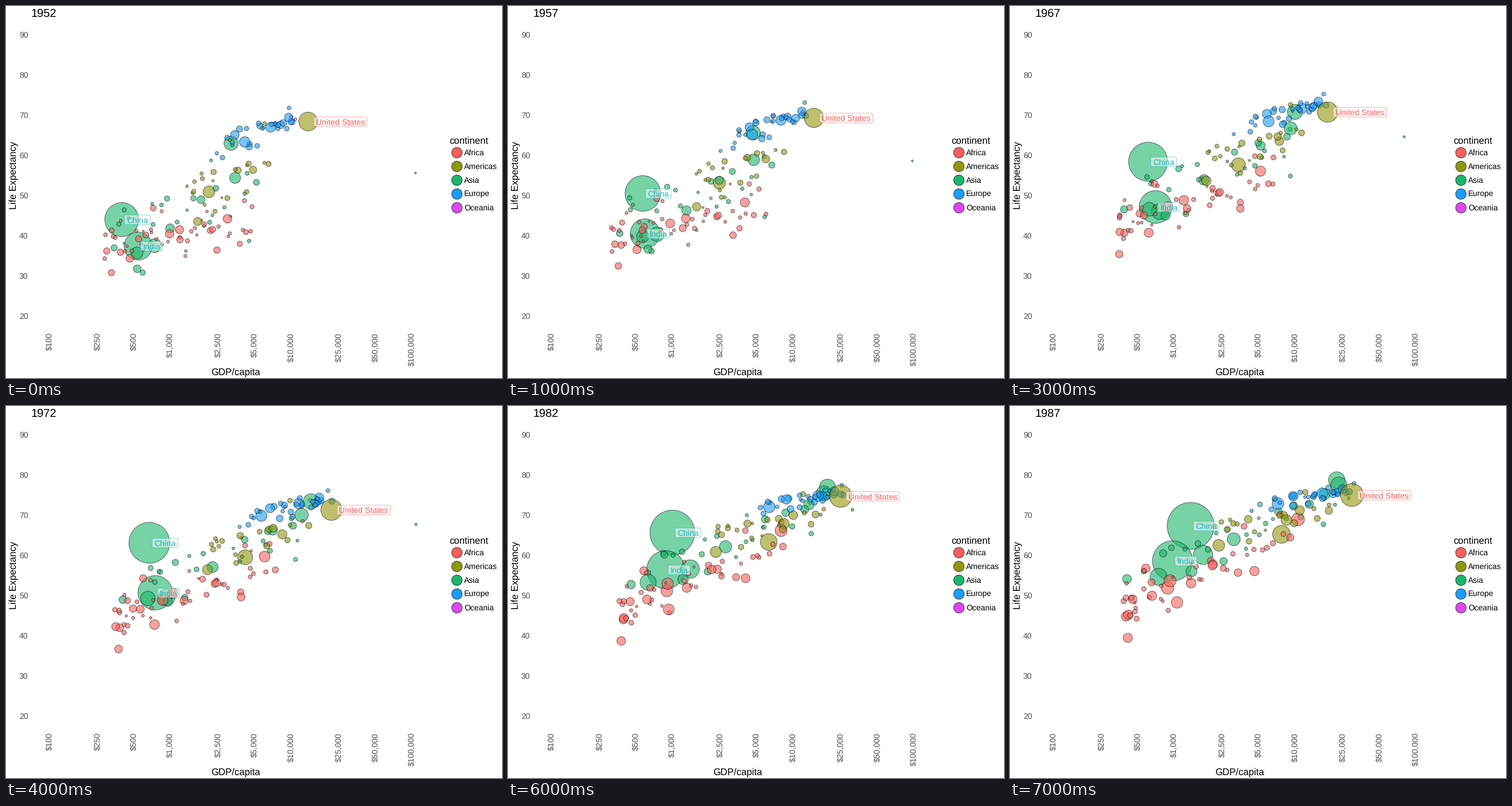
Write a matplotlib script that moves like this. It is 864 by 648 pixels and loops after 8000 ms.

```python
import numpy as np
import matplotlib.pyplot as plt
from matplotlib.animation import FuncAnimation
from matplotlib.colors import to_rgba
from matplotlib.patches import FancyBboxPatch

W, H, DPI = 864, 648, 72
STEPS = 8
FIRST_YEAR, YEAR_STEP = 1952, 5
TIME = np.linspace(0, 1, STEPS)
EASE = TIME * (3 - TIME) / 2

plt.rcParams["font.family"] = "Liberation Sans"
plt.rcParams["text.hinting"] = "no_hinting"

COLORS = {
    "Africa": "#f8605b",
    "Americas": "#92970a",
    "Asia": "#1cb56b",
    "Europe": "#199df8",
    "Oceania": "#dd46f0",
}
GREY, TEAL, RED = "#4d4d4d", "#1fb3bf", "#f8605b"

# Clouds of small countries, as (count, median population, population spread,
# population growth), then the shape at the start and at the end:
# (lowest log income, income span, skew, mid life, life per decade, life noise)
CLOUDS = {
    "Oceania": ((2, 5, 0.9, 1.8), (4.0, 0.03, 1, 69.2, 0, 0.2), (4.27, 0.07, 1, 75.3, 20, 0.3)),
    "Asia": ((28, 5, 1.1, 2.3), (2.5, 1.25, 1, 45, 11, 6), (2.6, 1.8, 0.85, 66, 12, 2.8)),
    "Africa": ((52, 2.8, 1.05, 2.45), (2.47, 1.25, 1.3, 39.5, 3, 4), (2.6, 1.45, 1.8, 52.5, 13, 4.2)),
    "Americas": ((23, 3, 1.05, 2.4), (3.13, 0.7, 1.2, 53.5, 20, 4.5), (3.33, 1.0, 1.2, 68.5, 9, 2.5)),
    "Europe": ((30, 8, 0.95, 1.25), (3.3, 0.72, 0.65, 66, 15, 1.6), (3.57, 0.9, 0.6, 74.8, 6, 0.9)),
}

# Single bubbles: continent, population range, key points (step, income, life)
TRACKS = {
    "China": ("Asia", (556, 1084), [
        (0, 400, 44), (1, 576, 50.5), (2, 488, 44.5), (3, 613, 58.4),
        (4, 677, 63.1), (5, 741, 64), (7, 1379, 67.3)]),
    "India": ("Asia", (372, 788), [
        (0, 547, 37.4), (2, 658, 43.6), (5, 813, 54.2), (7, 977, 58.6)]),
    "Japan": ("Asia", (86, 122), [(0, 3217, 63), (4, 14779, 73.4), (7, 22376, 78.7)]),
    "Indonesia": ("Asia", (82, 169), [(0, 750, 37.5), (3, 762, 46), (7, 1748, 60.1)]),
    "Kuwait": ("Asia", (0.16, 1.9), [
        (0, 108382, 55.6), (3, 80895, 64.6), (4, 109348, 67.7), (6, 31354, 71.3),
        (7, 28118, 74.2)]),
    "Brazil": ("Americas", (57, 143), [(0, 2109, 50.9), (3, 3430, 57.6), (7, 7807, 65.2)]),
    "United States": ("Americas", (158, 243), [
        (0, 13990, 68.4), (2, 16173, 70.2), (4, 21806, 71.3), (6, 25010, 74.7),
        (7, 29884, 75)]),
}


def x_pos(log_income):
    return 75 + 210.3 * (log_income - 2)


def y_pos(life):
    return 680 - 7 * life


def path(log_income, life, pop):
    radius = 1.1 + 1.21 * np.sqrt(pop)
    return np.column_stack([x_pos(log_income), y_pos(life), radius])


def track(name):
    _, pop, keys = TRACKS[name]
    step, income, life = np.array(keys).T
    now = np.arange(STEPS)
    return path(np.interp(now, step, np.log10(income)),
                np.interp(now, step, life), np.geomspace(*pop, STEPS))


def ranks(values):
    """Evenly spread numbers in 0..1 in the order of the values."""
    return (np.argsort(np.argsort(values)) + 0.5) / len(values)


def cloud(continent, rng):
    (n, median, spread, growth), first, last = CLOUDS[continent]
    low, span, skew, life, slope, noise = (
        a + (b - a) * EASE for a, b in zip(first, last))
    start = ranks(rng.random(n))
    end = ranks(start + 0.15 * rng.normal(size=n))
    luck = np.clip(rng.normal(size=n), -2, 2)
    size = np.clip(rng.normal(size=n), -2.2, 2.2)
    for k in range(n):
        q = start[k] + (end[k] - start[k]) * TIME
        income = low + span * q ** skew
        offset = income - low - span * 0.5 ** skew
        wobble = 0.02 * rng.normal(size=STEPS)
        pop = median * np.exp(spread * size[k]) * growth ** TIME
        yield path(income + wobble, life + slope * offset + noise * luck[k], pop)


def build():
    rng = np.random.default_rng(12)
    *others, front = TRACKS
    items = [(c, p) for c in ["Oceania"] for p in cloud(c, rng)]
    items += [(TRACKS[name][0], track(name)) for name in others]
    items += [(c, p) for c in CLOUDS if c != "Oceania" for p in cloud(c, rng)]
    items.append((TRACKS[front][0], track(front)))
    return [c for c, _ in items], np.array([p for _, p in items])


continents, paths = build()

fig = plt.figure(figsize=(W / DPI, H / DPI), dpi=DPI, facecolor="white")
ax = fig.add_axes([0, 0, 1, 1])
ax.set_xlim(0, W)
ax.set_ylim(H, 0)
ax.axis("off")


def write(x, y, text, size, **style):
    return ax.text(x, y, text, size=size, va="baseline",
                   rotation_mode="anchor", **style)


for v in range(20, 100, 10):
    write(38.5, y_pos(v) + 5, str(v), 14, color=GREY, ha="right")
for v in [m * 10 ** e for e in (2, 3, 4) for m in (1, 2.5, 5)] + [10 ** 5]:
    write(x_pos(np.log10(v)) + 5, 569, f"${v:,.0f}", 14, color=GREY,
          ha="right", rotation=90)
write(400, 642, "GDP/capita", 16.8, ha="center")
write(17, 295, "Life Expectancy", 16.8, ha="center", rotation=90)

write(772.5, 240, "continent", 16.8)
for k, (name, color) in enumerate(COLORS.items()):
    y = 254.5 + 24 * k
    ax.scatter([784.5], [y], s=18.4 ** 2, c=color, edgecolors="#333333", linewidths=0.9)
    write(798, y + 5, name, 13.9)

title = write(43, 20, "", 20)
dots = ax.scatter(paths[:, 0, 0], paths[:, 0, 1],
                  facecolors=[to_rgba(COLORS[c], 0.6) for c in continents],
                  edgecolors=[(0, 0, 0, 0.6)], linewidths=0.9, zorder=2)


class Label:
    """Country tag that follows its bubble."""

    def __init__(self, name, color, z):
        self.path = track(name)
        self.text = write(0, 0, name, 14.3, color=color, zorder=z + 0.1)
        width = self.text.get_window_extent(fig.canvas.get_renderer()).width
        self.shift = 5 + 0.1 * width
        self.box = FancyBboxPatch((0, 0), width + 7.5, 16.5, zorder=z,
                                  boxstyle="round,pad=0,rounding_size=2.2",
                                  fc=(1, 1, 1, 0.5), ec=to_rgba(color, 0.6), lw=0.9)
        ax.add_patch(self.box)

    def move(self, i):
        x, y, _ = self.path[i]
        x += self.shift
        self.box.set_x(x - 4)
        self.box.set_y(y - 8)
        self.text.set_position((x, y + 5.4))


labels = [Label("China", TEAL, 4), Label("India", TEAL, 5),
          Label("United States", RED, 6)]


def update(i):
    title.set_text(str(FIRST_YEAR + YEAR_STEP * i))
    dots.set_offsets(paths[:, i, :2])
    dots.set_sizes((2 * paths[:, i, 2]) ** 2)
    for label in labels:
        label.move(i)
    return [title, dots]


anim = FuncAnimation(fig, update, frames=STEPS, interval=1000, repeat=True, blit=False)
plt.show()
```
